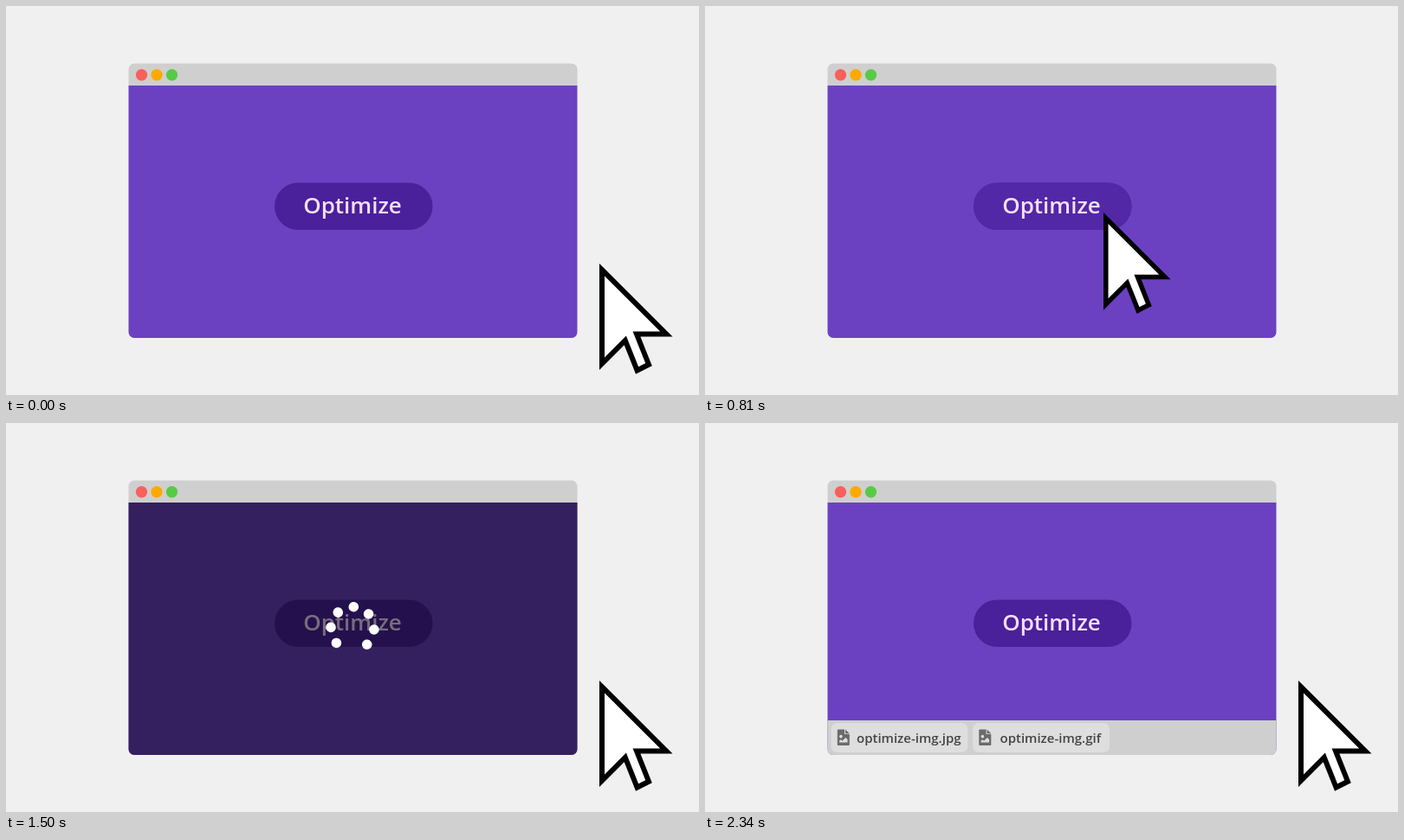
An HTML page that plays this animation: 800x450 px, repeating every 3110 ms.

```html
<!DOCTYPE html>
<html lang="en">
<head>
<meta charset="utf-8">
<title>Optimize</title>
<style>
  html, body { margin: 0; width: 100%; height: 100%; overflow: hidden; background: #f0f0f0; }
  svg { display: block; width: 100%; height: 100%; }
  text { font-family: "Open Sans", "Noto Sans", sans-serif; font-weight: 600; }
</style>
</head>
<body>
<svg viewBox="0 0 800 450">
  <defs>
    <clipPath id="frame"><rect x="141.5" y="66.5" width="518" height="317.5" rx="6.5"/></clipPath>
    <g id="chip">
      <rect width="158" height="34" rx="7" fill="#dedede"/>
      <path fill="#6b6b6b" fill-rule="evenodd" d="M8 7.5h7.5v5.5h5.8v12q0 1-1 1h-12q-1 0-1-1v-16.5q0-1 1-1z
        M11.4 13.8a1.8 1.8 0 1 0 .01 0z M9.6 22.6v-1.8l1.7-1.5 1.7 1.5 3.8-3.8 2.2 2v3.6z"/>
      <path fill="#6b6b6b" d="M16.5 7.5l4.8 4.7h-4.8z"/>
    </g>
  </defs>

  <g clip-path="url(#frame)">
    <path fill="#cfcfcf" d="M141 66h519v26H141z"/>
    <circle cx="156.5" cy="79.7" r="6.7" fill="#f9605b"/>
    <circle cx="174" cy="79.7" r="6.7" fill="#fda900"/>
    <circle cx="191.5" cy="79.7" r="6.7" fill="#57cb45"/>
    <path fill="#6b41c2" d="M141 92h519v293H141z"/>
    <rect x="310" y="204.5" width="182.5" height="54.5" rx="27.25" fill="#4a209b"/>
    <rect id="hover" x="310" y="204.5" width="182.5" height="54.5" rx="27.25" fill="#5228a6"/>
    <text x="400" y="240" font-size="26" text-anchor="middle" fill="#f5e0ff">Optimize</text>
    <path id="shade" d="M141 92h519v293H141z"/>
    <g id="bar">
      <path fill="#cfcfcf" d="M141 344h519v41H141z"/>
      <use href="#chip" x="145.5" y="347"/>
      <use href="#chip" x="309" y="347"/>
      <g font-size="15" fill="#444">
        <text x="175" y="370">optimize-img.jpg</text>
        <text x="340.5" y="370">optimize-img.gif</text>
      </g>
    </g>
  </g>

  <g id="spinner" fill="#fff"></g>
  <g id="check">
    <circle r="32" fill="#47b02c"/>
    <path d="M-17 2L-6.5 12 17.5-10" fill="none" stroke="#fff" stroke-width="8"/>
  </g>
  <path id="cursor" fill="#fff" stroke="#000" stroke-width="6" stroke-miterlimit="10"
    d="M688 305.2L762.3 379.5H728L742 414.7 728.6 421.5 714.8 386.9 688 413.8z"/>
</svg>
<script>
  const LOOP = 3110, STEP = 30;
  const $ = id => document.getElementById(id);
  const set = (id, name, value) => $(id).setAttribute(name, value);
  const ramp = (t, from, to) => Math.min(1, Math.max(0, (t - from) / (to - from)));
  const ease = (t, from, to) => (1 - Math.cos(Math.PI * ramp(t, from, to))) / 2;

  // Eight places on a ring, the first one left empty
  for (let i = 1; i < 8; i++) {
    const a = i * Math.PI / 4;
    $("spinner").innerHTML += `<circle cx="${25 * Math.cos(a)}" cy="${25 * Math.sin(a)}" r="5.8"/>`;
  }

  function draw(t) {
    const reach = ease(t, 240, 640) - ease(t, 810, 1210);
    const press = ease(t, 640, 810) - ease(t, 810, 960);
    set("cursor", "transform", `translate(${727.5 - 228.5 * reach} ${362 - 64.5 * reach})
      scale(${1 - 0.083 * press}) translate(-727.5 -362)`);
    set("hover", "opacity", ease(t, 540, 640) - ease(t, 840, 960));

    const dim = ease(t, 810, 1010) - ease(t, 2130, 2340);
    set("shade", "opacity", 0.51 * dim);

    set("spinner", "opacity", dim * (1 - ramp(t, 1530, 1590)));
    set("spinner", "transform", `translate(400 237.7) rotate(${-45 + 0.2 * (t - 810)})`);

    const pop = 1.17 * ease(t, 1530, 1640) - 0.17 * ease(t, 1640, 1710);
    set("check", "opacity", dim);
    set("check", "transform", `translate(401.5 238) scale(${pop})`);

    const drop = 40 * (1 - ramp(t, 1830, 2100)) ** 2.1;
    set("bar", "transform", `translate(0 ${drop})`);
  }

  function tick() {
    const t = performance.now() % LOOP;
    draw(Math.floor(t / STEP) * STEP);
    requestAnimationFrame(tick);
  }
  tick();
</script>
</body>
</html>
```
